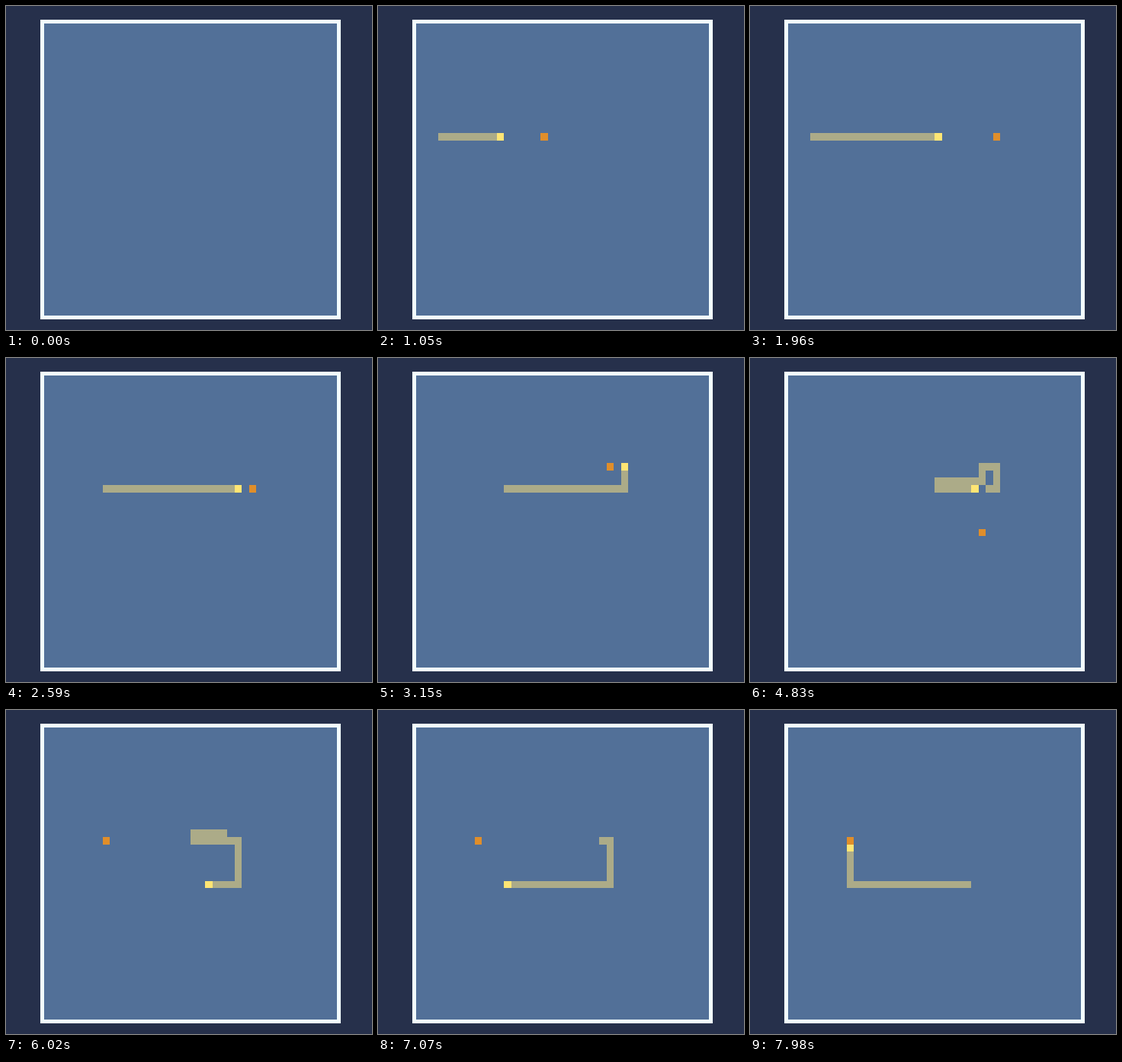
Animation of 480 by 426 pixels, one loop 8000 ms. Source, as an HTML page with a canvas:

```html
<!DOCTYPE html>
<html lang="en">
<head>
<meta charset="utf-8">
<title>Snake</title>
<style>
  html, body { margin: 0; width: 100%; height: 100%; overflow: hidden; background: #26304b; }
  canvas { display: block; }
</style>
</head>
<body>
<canvas id="stage" width="480" height="426"></canvas>
<script>
const ctx = document.getElementById('stage').getContext('2d');

const LOOP = 8000;
const CELL = 9.6, LEFT = 50, TOP = 23, SIDE = 384, BORDER = 5;
const COLORS = {
  page: '#26304b', border: '#f2fdfe', board: '#527098',
  body: '#acab88', head: '#ffe574', food: '#e08e2a'
};

// Moves land on a 70 ms clock, ten moves to every fifteen ticks.
const TICK = 70, FIRST_MOVE = 560;
const BEAT = [0, 2, 3, 4, 6, 8, 9, 10, 12, 13];

const CORNERS = [
  [2, 15], [28, 15], [28, 12], [26, 12], [26, 14], [20, 14],
  [20, 15], [26, 15], [26, 21], [8, 21], [8, 15]
];
const FOODS = [[17, 15], [28, 15], [26, 12], [26, 21], [8, 15]];
const START_HEAD = 4, BASE_LENGTH = 18;

function tracePath(corners) {
  const cells = [corners[0]];
  for (const [tx, ty] of corners.slice(1)) {
    let [x, y] = cells[cells.length - 1];
    while (x !== tx || y !== ty) {
      x += Math.sign(tx - x);
      y += Math.sign(ty - y);
      cells.push([x, y]);
    }
  }
  return cells;
}

const path = tracePath(CORNERS);

// Path position at which each food is first reached, in order.
let reached = 0;
const meals = FOODS.map(([fx, fy]) => {
  reached = path.findIndex(([x, y], i) => i >= reached && x === fx && y === fy);
  return reached;
});

function moveTime(n) {
  if (n === 0) return FIRST_MOVE;
  const i = n - 1;
  return TICK * (9 + 15 * Math.floor(i / 10) + BEAT[i % 10]);
}

function moveAt(t) {
  let n = -1;
  while (moveTime(n + 1) <= t) n++;
  return n;
}

function drawCell([col, row], color) {
  const x = Math.round(LEFT + col * CELL), y = Math.round(TOP + row * CELL);
  const right = Math.round(LEFT + (col + 1) * CELL);
  const bottom = Math.round(TOP + (row + 1) * CELL);
  ctx.fillStyle = color;
  ctx.fillRect(x, y, right - x, bottom - y);
}

function drawBoard() {
  ctx.fillStyle = COLORS.page;
  ctx.fillRect(0, 0, 480, 426);
  ctx.fillStyle = COLORS.border;
  ctx.fillRect(LEFT - BORDER, TOP - BORDER, SIDE + 2 * BORDER, SIDE + 2 * BORDER);
  ctx.fillStyle = COLORS.board;
  ctx.fillRect(LEFT, TOP, SIDE, SIDE);
}

function draw(t) {
  drawBoard();
  const n = moveAt(t);
  if (n < 0) return;
  const head = Math.min(START_HEAD + n, path.length - 1);
  const eaten = meals.filter(m => m <= head).length;
  const tail = Math.max(n ? 1 : 0, head - (BASE_LENGTH + eaten) + 1);
  if (eaten < FOODS.length) drawCell(FOODS[eaten], COLORS.food);
  for (let i = tail; i < head; i++) drawCell(path[i], COLORS.body);
  drawCell(path[head], COLORS.head);
}

const start = performance.now();
function frame() {
  draw((performance.now() - start) % LOOP);
  requestAnimationFrame(frame);
}
frame();
</script>
</body>
</html>
```
